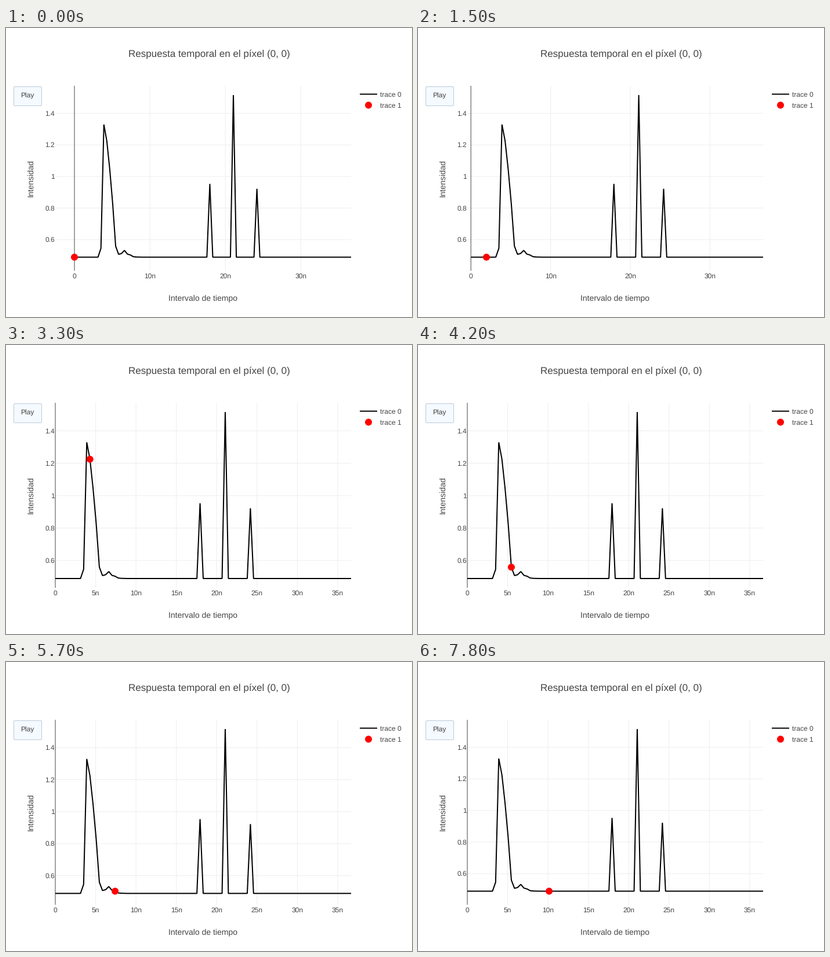
A matplotlib script that plays this animation: 700x500 px, repeating every 8 s.

```python
import matplotlib.pyplot as plt
import numpy as np
from matplotlib.animation import FuncAnimation
from matplotlib.patches import Circle, FancyBboxPatch

plt.rcParams.update({"font.family": "Liberation Sans", "text.hinting": "none",
                     "text.color": "#444444"})

W, H, DPI = 700, 500, 100
LEFT, RIGHT, TOP, BOTTOM = 85, 595, 100, 420
PT = 72 / DPI          # points per pixel
MARK_PAD = 7.5         # extra autorange padding around the marker
X_PAD = 0.05 * (RIGHT - LEFT)
Y_PAD = 0.05 * (BOTTOM - TOP)
INTERVAL, FRAMES, FRAMES_PER_STEP = 100, 80, 3

# Signal: flat base, one decaying pulse and three spikes (time in ns)
DT, BASE = 0.39, 0.4885
times = np.arange(95) * DT
signal = np.full(95, BASE)
signal[9:23] = [0.545, 1.329, 1.225, 1.045, 0.826, 0.5585, 0.5065,
                0.512, 0.5315, 0.508, 0.5025, 0.4915, 0.4895, 0.489]
signal[[46, 54, 62]] = 0.953, 1.516, 0.922
T_END, PEAK = times[-1], signal.max()

fig = plt.figure(figsize=(W / DPI, H / DPI), dpi=DPI, facecolor="white")
ax = fig.add_axes([0, 0, 1, 1])
ax.set_xlim(0, W)
ax.set_ylim(H, 0)
ax.axis("off")


def stroke(xs, ys, color, width, z):
    return ax.plot(xs, ys, color=color, lw=width * PT, zorder=z, snap=False,
                   solid_capstyle="butt", solid_joinstyle="bevel")[0]


def label(x, y, text, size=12, ha="left", **kw):
    return ax.text(x, y, text, fontsize=size * PT, ha=ha, va="baseline", **kw)


def dot(x, y):
    return ax.add_patch(Circle((x, y), 6, fc="red", ec="none", zorder=5))


# Fixed parts
label(350, 50, "Respuesta temporal en el píxel (0, 0)", 17, "center")
label(340, 472, "Intervalo de tiempo", 14, "center")
label(47, 260, "Intensidad", 14, "center", rotation=90, rotation_mode="anchor")
ax.add_patch(FancyBboxPatch((13.5, 101.5), 48, 33, fc="#F4FAFF", ec="#BEC8D9",
                            boxstyle="round,pad=0,rounding_size=2",
                            lw=PT, snap=False))
label(25, 121, "Play")
stroke([610, 640], [114.5, 114.5], "black", 2, 4)
dot(625, 133.5)
label(645, 119, "trace 0")
label(645, 138, "trace 1")

# Moving parts
x_ticks = {}
for n in range(0, 40, 5):
    line = stroke([0, 0], [TOP, BOTTOM], "#eeeeee" if n else "#444444",
                  1, 2 if n else 3)
    x_ticks[n] = line, label(0, 433, f"{n}n" if n else "0", ha="center")
y_ticks = {}
for v in (0.6, 0.8, 1.0, 1.2, 1.4):
    y_ticks[v] = (stroke([LEFT, RIGHT], [0, 0], "#eeeeee", 1, 1),
                  label(84, 0, f"{v:g}", ha="right"))
trace = stroke([], [], "black", 2, 4)
marker = dot(0, 0)


def draw(frame):
    k = frame // FRAMES_PER_STEP
    t, value = times[k], signal[k]

    # Autorange: the larger span per pixel of line and padded marker wins
    width, height = RIGHT - LEFT, BOTTOM - TOP
    ns_per_px = max(T_END / width, (T_END - t) / (width - X_PAD - MARK_PAD))
    unit_per_px = max((PEAK - BASE) / (height - 2 * Y_PAD),
                      (PEAK - value) / (height - 2 * Y_PAD - MARK_PAD))

    def to_x(ns):
        return RIGHT - (T_END - ns) / ns_per_px

    def to_y(v):
        return TOP + Y_PAD + (PEAK - v) / unit_per_px

    tick_step = 10 if ns_per_px * width / (width / 80 + 1) > 5 else 5
    for n, (line, text) in x_ticks.items():
        x = to_x(n)
        line.set_xdata([x, x])
        text.set_x(x)
        line.set_visible(n % tick_step == 0)
        text.set_visible(n % tick_step == 0)
    for v, (line, text) in y_ticks.items():
        y = to_y(v)
        line.set_ydata([y, y])
        text.set_y(y + 4.2)

    trace.set_data(to_x(times), to_y(signal))
    marker.center = to_x(t), to_y(value)
    return []


anim = FuncAnimation(fig, draw, frames=FRAMES, interval=INTERVAL,
                     init_func=lambda: draw(0), repeat=True, repeat_delay=0,
                     blit=False)
plt.show()
```
